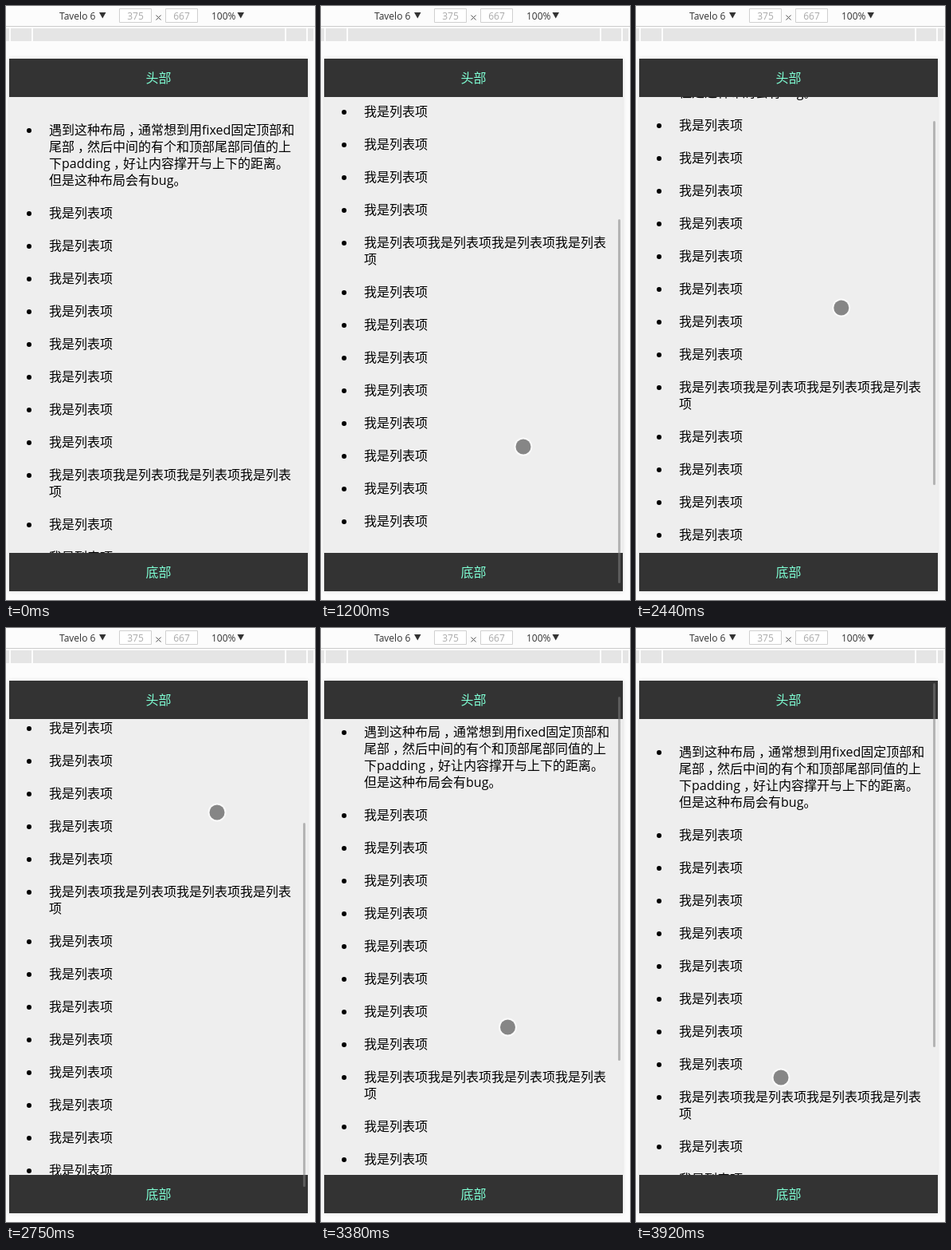
An HTML page that plays this animation: 388x744 px, repeating every 4.21 s.

```html
<!DOCTYPE html>
<html lang="zh-CN">
<head>
<meta charset="utf-8">
<style>
  html, body { margin: 0; width: 100%; height: 100%; overflow: hidden; background: #fcfcfc; }
  body { position: relative; font: 16px/21px "Open Sans", "Noto Sans CJK SC", sans-serif; color: #000; }
  svg, .device, .edge, .view, #bar, #cursor { position: absolute; }
  svg { left: 0; top: 0; font-size: 12px; }
  .device { left: 4px; top: 66px; width: 375px; height: 667px; background: #eee; box-shadow: 0 0 5px rgba(0, 0, 0, .15); }
  .edge { left: 0; width: 100%; height: 48px; line-height: 48px; text-align: center; background: #333; color: #7fffd4; }
  .view { left: 0; top: 48px; width: 100%; height: 571px; overflow: hidden; }
  ul { margin: 0; padding: 31px 0 0 50px; list-style: none; white-space: nowrap; }
  li { position: relative; margin-bottom: 20px; }
  li::before { content: ""; position: absolute; left: -28px; top: 8px; width: 6px; height: 6px; border-radius: 50%; background: #000; }
  .comma { position: relative; left: 4px; }
  #bar { left: 373px; top: 69px; width: 3px; height: 456px; border-radius: 1.5px; background: rgba(128, 128, 128, .52); }
  #cursor { left: -9.5px; top: -9.5px; width: 19px; height: 19px; border-radius: 50%; background: #868686; box-shadow: 0 0 0 2px rgba(255, 255, 255, .7); }
</style>
</head>
<body>
<svg width="388" height="66">
  <path d="M0 25.5H388" stroke="#ccc"/>
  <path d="M0 28h4v16H0zM6 28h26v16H6zM34 28h316v16H34zM352 28h25v16h-25zM379 28h7v16h-7z" fill="#e5e5e5"/>
  <path d="M142.5 3.5h40v17h-40zM200.5 3.5h40v17h-40z" fill="#fff" stroke="#d0d0d0"/>
  <path d="M117 8h8.5l-4.25 7.5zM290.5 8h8.5l-4.25 7.5z" fill="#333"/>
  <path d="M188.5 11.5l6 6m0-6l-6 6" stroke="#555"/>
  <g fill="#333"><text x="67" y="17">Tavelo 6</text><text x="258" y="17">100%</text></g>
  <g fill="#aaa" text-anchor="middle"><text x="162.5" y="17">375</text><text x="220.5" y="17">667</text></g>
</svg>
<div class="device">
  <div class="view"><ul id="list"></ul></div>
  <div class="edge" style="top:0">头部</div>
  <div class="edge" style="bottom:0">底部</div>
</div>
<div id="bar"></div>
<div id="cursor"></div>
<script>
const LOOP = 4210;
const [list, bar, cursor] = ['list', 'bar', 'cursor'].map(id => document.getElementById(id));

const item = '我是列表项';
const intro = '遇到这种布局，通常想到用fixed固定顶部和<br>尾部，然后中间的有个和顶部尾部同值的上<br>下padding，好让内容撑开与上下的距离。<br>但是这种布局会有bug。'
  .replaceAll('，', '<span class="comma">，</span>');
const wrapped = item.repeat(3) + '我是列表<br>项';
const rows = [intro, ...Array(8).fill(item), wrapped, ...Array(8).fill(item)];
list.innerHTML = rows.map(row => `<li>${row}</li>`).join('');

// Wheel moves keep the cursor still; in drags it follows the content: y = grip - scroll.
const moves = [
  { at: 740, step: 76.6, scroll: [13, 70, 135, 195, 245, 278, 291], x: 253.5, y: 551.5 },
  { at: 1510, step: 70, scroll: [250, 140, 45, 0], x: 253.5, y: 551.5 },
  { at: 2130, step: 80, scroll: [0], x: 253.5, y: 551.5, fade: .7 },
  { at: 2280, step: 78.3, scroll: [10, 50, 110, 170, 215, 245, 257], x: 253.7, dx: 1.8, grip: 487.5 },
  { at: 2840, step: 77.5, scroll: [275, 291, 282, 240, 167, 68], x: 264.3, dx: -8.2, grip: 478.5 },
  { at: 3330, step: 80, scroll: [0], x: 226, grip: 478.5 },
  { at: 3380, step: 76.6, scroll: [25, 140, 225, 252, 215, 115, 0], x: 234, dx: -8.5, grip: 524.5 },
  { at: 3920, step: 80, scroll: [0], x: 181.5, y: 562.5 }
];

function draw(now) {
  const t = now % LOOP;
  const move = moves.findLast(m => t >= m.at);
  bar.hidden = cursor.hidden = !move;
  let scroll = 0;
  if (move) {
    const k = Math.min(move.scroll.length - 1, Math.floor((t - move.at) / move.step));
    scroll = move.scroll[k];
    const x = move.x + (move.dx || 0) * k;
    const y = move.y ?? move.grip - scroll;
    cursor.style.transform = `translate(${x}px, ${y}px)`;
    bar.style.transform = `translateY(${Math.round(scroll * .68)}px)`;
    bar.style.opacity = move.fade ?? 1;
  }
  list.style.transform = `translateY(${-scroll}px)`;
}

const start = performance.now();
function tick() {
  draw(performance.now() - start);
  requestAnimationFrame(tick);
}
tick();
</script>
</body>
</html>
```
